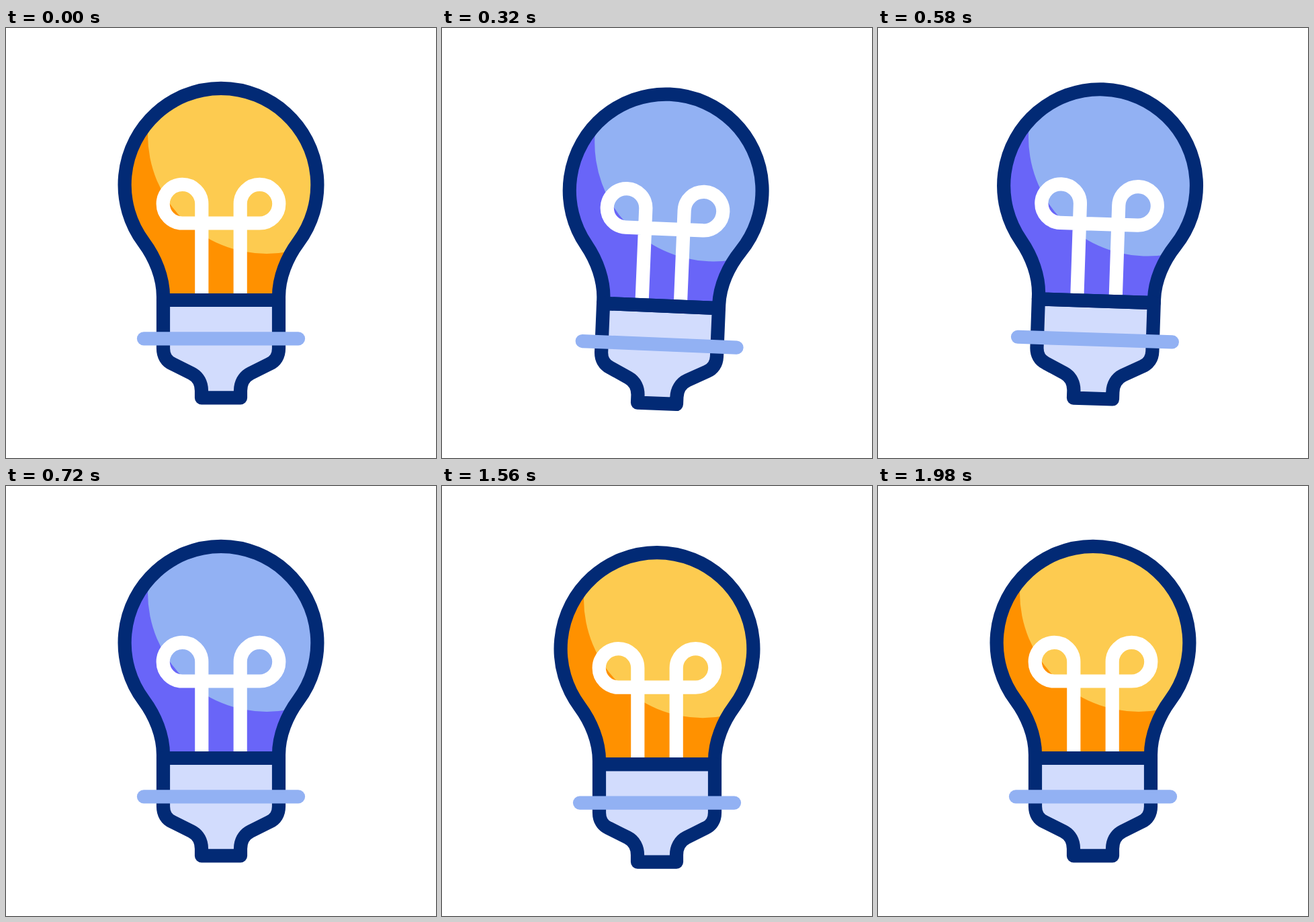
Write an HTML page that moves like this. It is 640 px wide and 640 px high and loops after 2400 ms.

```html
<!DOCTYPE html>
<html lang="en">
<head>
<meta charset="utf-8">
<title>Light bulb switch</title>
<style>
  html, body { margin: 0; width: 100%; height: 100%; overflow: hidden; background: #fff; }
  svg { display: block; width: 100vw; height: 100vh; }
  .line { fill: none; stroke-width: 20.2; stroke-linejoin: round; }
  .navy { stroke: #022a75; }
  .round { stroke-linecap: round; }
</style>
</head>
<body>
<svg viewBox="0 0 640 640">
  <defs>
    <path id="glass" d="M234 405V400C234 371 222 342 205 319A143.4 143.4 0 1 1 435 319C418 342 406 371 406 400V405Z"/>
    <path id="socket" d="M234 405V477C234 488 239 496 248 500L276 514C286 519 291 529 291 540V550.4H349V540C349 529 354 519 364 514L392 500C401 496 406 488 406 477V405Z"/>
    <clipPath id="inside"><use href="#glass"/></clipPath>
  </defs>
  <g id="rays" class="line round" stroke="#fdcb50"></g>
  <g id="bulb">
    <use id="shade" href="#glass"/>
    <circle id="light" cx="388" cy="159" r="177" clip-path="url(#inside)"/>
    <path class="line" stroke="#fff" d="M291.3 405V261.7a28.8 28.8 0 1 0 -28.8 28.8H377.5a28.8 28.8 0 1 0 -28.8 -28.8V405"/>
    <use href="#socket" fill="#d2dcfd"/>
    <use href="#glass" class="line navy"/>
    <use href="#socket" class="line navy"/>
    <path class="line round" stroke="#92b1f3" d="M205 462.4H435"/>
  </g>
</svg>
<script>
const LOOP = 2400, STEP = 20, OFF_AT = 20, ON_AT = 1280;
const LENGTH = 700, PRESS = 233, DEPTH = 11.2;
const TILT = [[0, 0], [167, -5], [367, 5], [LENGTH, 0]];
const LIT = { light: '#fdcb50', shade: '#ff9100' };
const DARK = { light: '#92b1f3', shade: '#6965f8' };

// start x, start y, end x, end y
const RAYS = [
  [242.4, 202, 117.5, 102],
  [346, 225.8, 523, 133],
  [195, 295, 100.3, 304.5],
  [410, 301.4, 530, 309.6]
];

const $ = id => document.getElementById(id);
const clamp = x => Math.min(1, Math.max(0, x));
const mix = (a, b, k) => a + (b - a) * k;
const ramp = (t, a, b) => {
  const x = clamp((t - a) / (b - a));
  return x * x * (3 - 2 * x);
};

function track(keys, t) {
  for (let i = 1; i < keys.length; i++) {
    const [a, from] = keys[i - 1], [b, to] = keys[i];
    if (t <= b) return mix(from, to, ramp(t, a, b));
  }
  return keys[keys.length - 1][1];
}

// Quick drop, then a decelerating return
function dip(t) {
  if (t <= 0 || t >= LENGTH) return 0;
  return DEPTH * (t < PRESS ? (t / PRESS) ** 2 : ((LENGTH - t) / (LENGTH - PRESS)) ** 1.9);
}

const rays = RAYS.map(() => {
  const el = document.createElementNS('http://www.w3.org/2000/svg', 'path');
  $('rays').append(el);
  return el;
});

function drawRays(t) {
  const head = ramp(t, 67, 267), tail = ramp(t, 100, 300);
  const shown = head - tail > 0.005;
  RAYS.forEach(([x1, y1, x2, y2], i) => {
    const at = k => `${mix(x1, x2, k)} ${mix(y1, y2, k)}`;
    rays[i].setAttribute('d', shown ? `M${at(tail)}L${at(head)}` : '');
  });
}

function draw(time) {
  const off = time - OFF_AT, on = time - ON_AT;
  const y = dip(off) + dip(on);
  const angle = track(TILT, clamp(off / LENGTH) * LENGTH);
  const colors = off < PRESS || on >= PRESS ? LIT : DARK;
  $('bulb').setAttribute('transform', `translate(0 ${y}) rotate(${angle} 320 550)`);
  $('light').setAttribute('fill', colors.light);
  $('shade').setAttribute('fill', colors.shade);
  drawRays(off);
}

const start = performance.now();
function tick() {
  const time = (performance.now() - start) % LOOP;
  draw(Math.floor(time / STEP) * STEP);
  requestAnimationFrame(tick);
}
tick();
</script>
</body>
</html>
```
